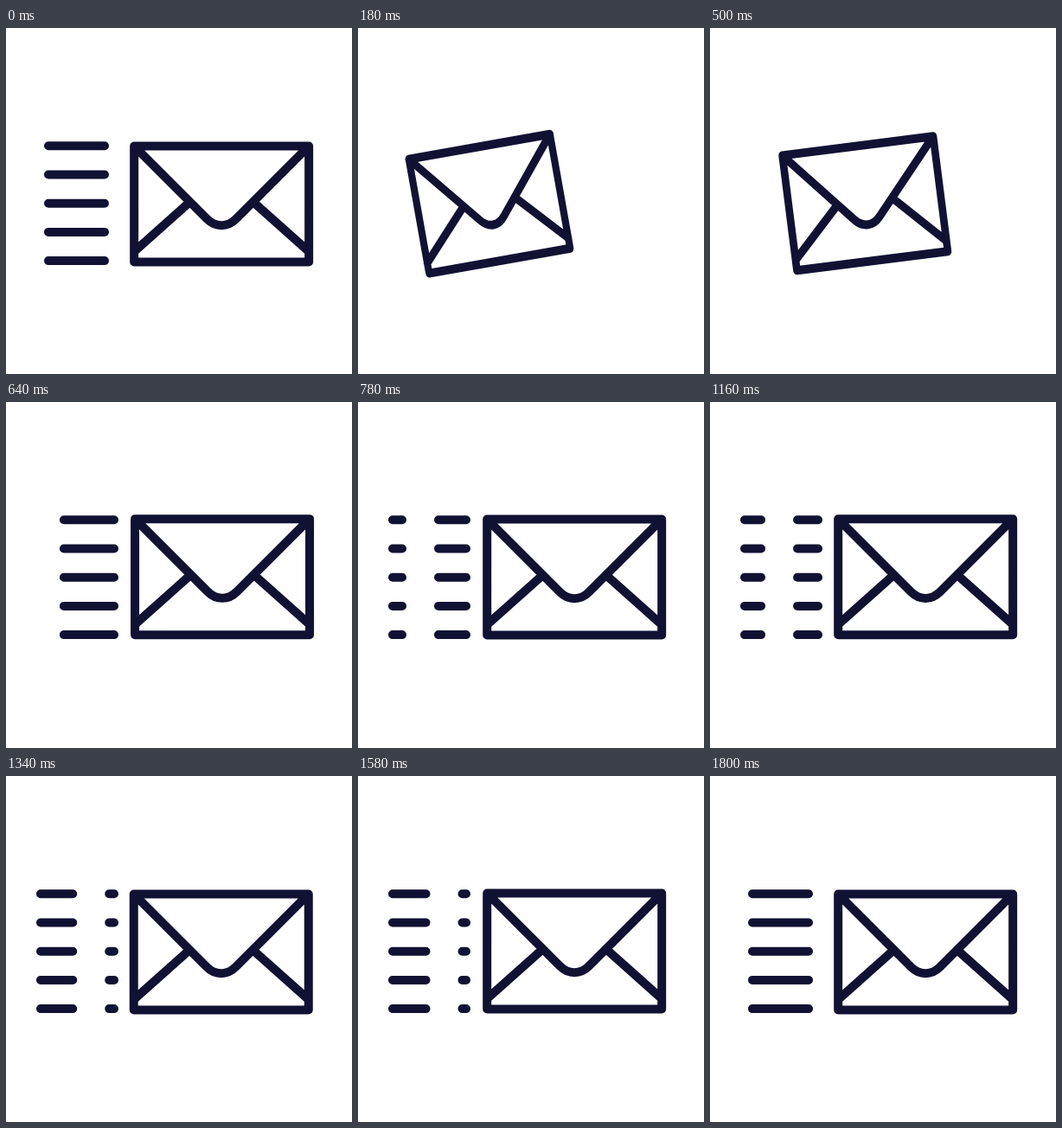
An HTML page with a canvas for the animation above (1.82 s loop, 400x400 px).

```html
<!DOCTYPE html>
<html>
<head>
<meta charset="utf-8">
<style>
html, body { margin: 0; width: 100%; height: 100%; overflow: hidden; background: #fff; }
canvas { display: block; }
</style>
</head>
<body>
<canvas id="stage" width="400" height="400"></canvas>
<script>
const ctx = document.getElementById('stage').getContext('2d');
const LOOP = 1820, INK = '#111133';
const DASH = 65, PERIOD = 107, LEFT = 40, RIGHT = 125;

const inOut = u => {
  u = Math.min(1, Math.max(0, u));
  return u < .5 ? 4 * u ** 3 : 1 - 4 * (1 - u) ** 3;
};

// 0 = flying at rest, 1 = pulled back and squeezed
const pull = t => inOut(t / 200) - inOut((t - 433) / 162);

function drawSpeedLines(t, p) {
  const left = LEFT + (RIGHT - LEFT) * Math.min(1, 1.6 * p);
  const rest = t < 300 ? 0 : 472 * (Math.max(0, 1800 - t) / 1020) ** 1.23;
  const start = (49 + rest) % PERIOD;
  ctx.beginPath();
  for (let x = start - PERIOD; x < RIGHT; x += PERIOD) {
    const a = Math.max(x, left), b = Math.min(x + DASH, RIGHT);
    if (b <= a) continue;
    for (let i = 0; i < 5; i++) {
      const y = 136.3 + i * 33.2;
      ctx.moveTo(a, y);
      ctx.lineTo(b, y);
    }
  }
  ctx.stroke();
}

function drawEnvelope(t, p) {
  const shake = 1 - .7 * p, phase = (t - 780) / 200 * 3;
  const wave = shift => Math.cos(2 * Math.PI * (phase + shift));
  ctx.save();
  ctx.translate(249.4 - 98 * p + .8 * shake * wave(0), 202.8 + .5 * p - .75 * shake * wave(.18));
  ctx.rotate(-10.1 * p * Math.PI / 180);
  ctx.scale(1 - .181 * p, 1);
  ctx.beginPath();
  ctx.rect(-101, -67, 202, 134);
  ctx.moveTo(-101, -67);
  ctx.lineTo(-17, 17);
  ctx.bezierCurveTo(-6.7, 27.3, 6.7, 27.3, 17, 17);
  ctx.lineTo(101, -67);
  for (const side of [-1, 1]) {
    ctx.moveTo(side * 101, 55);
    ctx.lineTo(side * 36.5, -2.5);
  }
  ctx.fill();
  ctx.stroke();
  ctx.restore();
}

function draw(now) {
  const t = now % LOOP, p = pull(t);
  ctx.fillStyle = '#fff';
  ctx.fillRect(0, 0, 400, 400);
  ctx.strokeStyle = INK;
  ctx.lineWidth = 10;
  ctx.lineCap = ctx.lineJoin = 'round';
  drawSpeedLines(t, p);
  drawEnvelope(t, p);
}

let begin;
function tick(now) {
  begin ??= now;
  draw(now - begin);
  requestAnimationFrame(tick);
}
draw(0);
requestAnimationFrame(tick);
</script>
</body>
</html>
```
